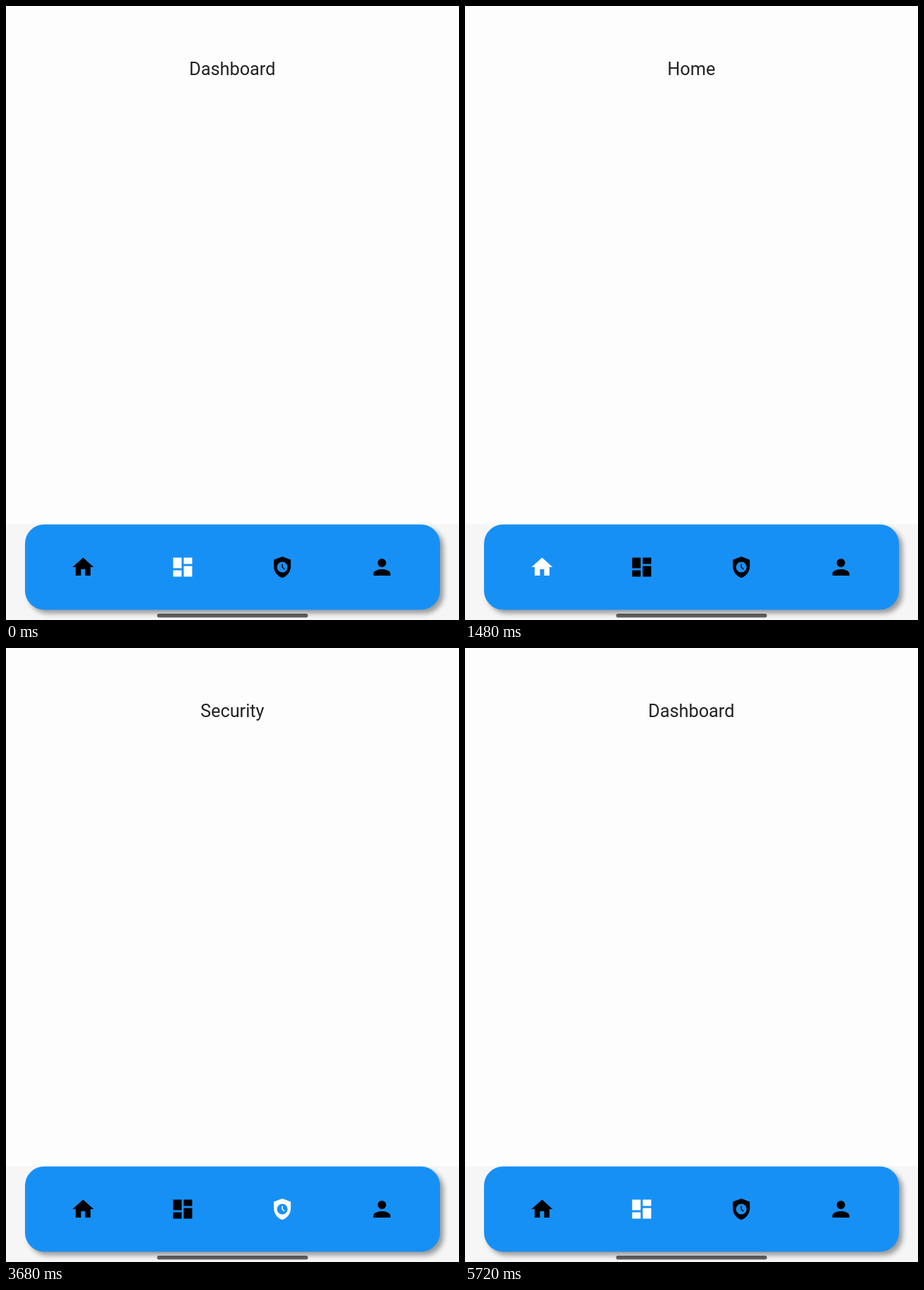
Write an HTML page that moves like this. It is 643x871 px and loops after 6.6 s.

```html
<!DOCTYPE html>
<html lang="en">
<head>
<meta charset="utf-8">
<title>Bottom navigation</title>
<style>
  html, body { margin: 0; width: 100%; height: 100%; overflow: hidden; background: #fdfdfd; }
  svg { display: block; width: 643px; height: 871px; }
  #title { font: 25.3px Roboto, sans-serif; text-anchor: middle; fill: #222; }
  #bar { fill: #1790f5; filter: drop-shadow(5px 5px 3.5px rgba(0, 0, 0, .38)); }
  .icon { fill: #000; fill-rule: evenodd; }
  .icon.on { fill: #fff; }
</style>
</head>
<body>
<svg viewBox="0 0 643 871">
  <rect y="735" width="643" height="136" fill="#f6f6f6"/>
  <text id="title" x="321.3" y="98"></text>
  <rect id="bar" height="121" rx="27"/>
  <path class="icon" d="M10 20v-6h4v6h5v-8h3L12 3 2 12h3v8z"/>
  <path class="icon" d="M3 13h8V3H3zM3 21h8v-6H3zM13 21h8V11h-8zM13 3v6h8V3z"/>
  <path class="icon" d="M12 2 4 5v6.1C4 16.1 7.4 20.8 12 22c4.6-1.2 8-5.9 8-10.9V5zM12 17a5 5 0 1 1 0-10 5 5 0 0 1 0 10zM13.65 14.35 11.5 12.2V9h1v2.8l1.85 1.85z"/>
  <path class="icon" d="M12 12a4 4 0 1 0 0-8 4 4 0 0 0 0 8zM12 14c-2.7 0-8 1.3-8 4v2h16v-2c0-2.7-5.3-4-8-4z"/>
  <rect x="214.5" y="862" width="214" height="5.5" rx="2.5" fill-opacity=".6"/>
</svg>
<script>
const LOOP = 6600, HALF = 300, INSET = 20.5, ITEM = 118;
const names = ['Home', 'Dashboard', 'Security'];
const taps = [{ at: 762, tab: 0 }, { at: 2435, tab: 2 }, { at: 3690, tab: 1 }];
const title = document.getElementById('title');
const bar = document.getElementById('bar');
const icons = document.querySelectorAll('.icon');

function draw(t) {
  let tab = 1, press = 0;
  for (const tap of taps) {
    const age = t - tap.at;
    if (age >= HALF) tab = tap.tab;
    press = Math.max(press, 1 - Math.abs(age - HALF) / HALF);
  }

  // The bar narrows and sinks while pressed; the items stay evenly spaced.
  const left = 27 + INSET * press;
  const top = 735.5 + INSET * press / 2;
  const width = 643 - 2 * left;
  const gap = (width - 4 * ITEM) / 5;
  bar.setAttribute('x', left);
  bar.setAttribute('y', top);
  bar.setAttribute('width', width);
  icons.forEach((icon, i) => {
    const x = left + gap + ITEM / 2 + i * (ITEM + gap);
    icon.setAttribute('transform', `translate(${x - 18} ${top + 42.5}) scale(1.5)`);
    icon.classList.toggle('on', i === tab);
  });
  title.textContent = names[tab];
}

function tick() {
  draw(performance.now() % LOOP);
  requestAnimationFrame(tick);
}
tick();
</script>
</body>
</html>
```
